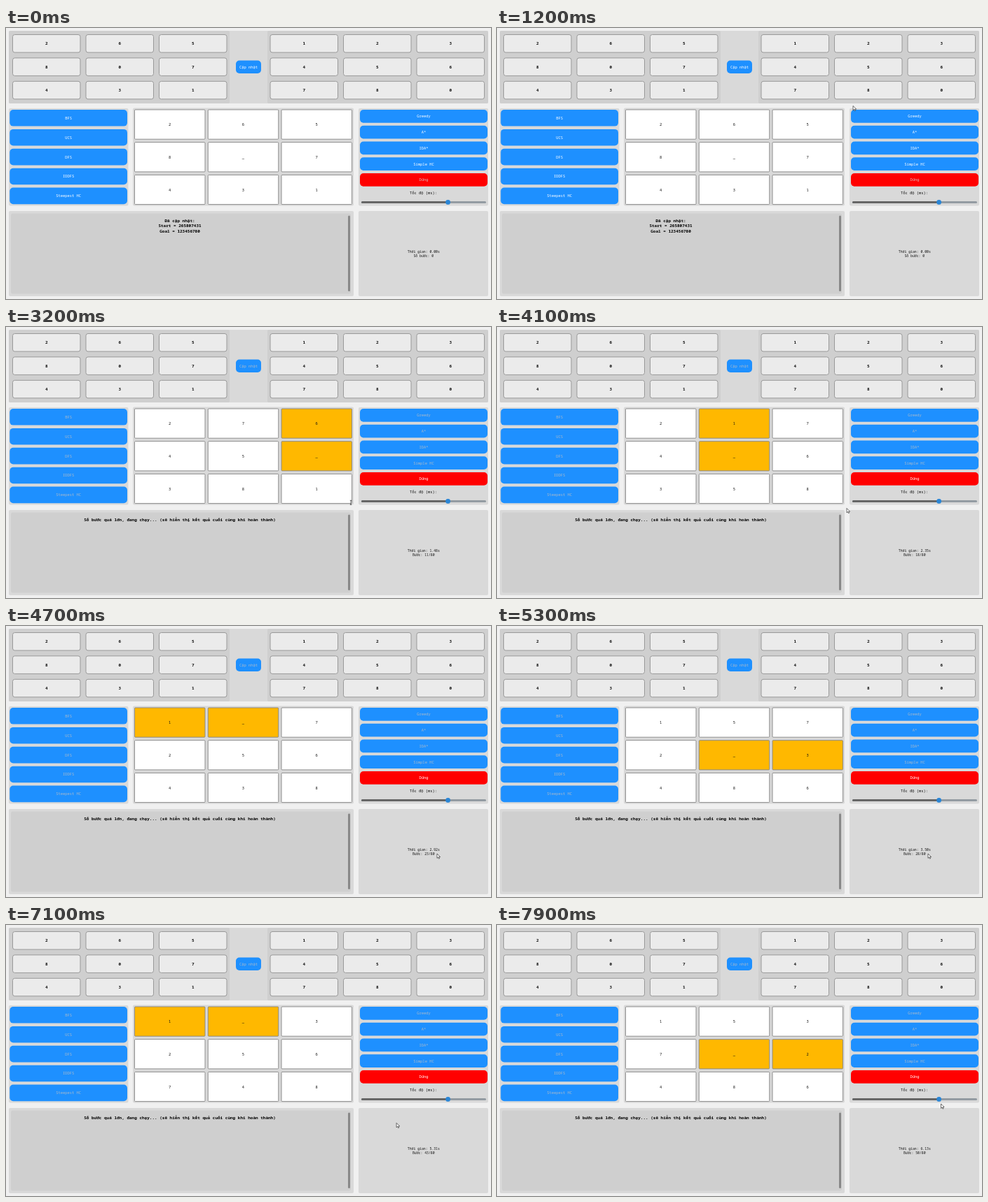
An HTML page for the animation above (8000 ms loop, 692 px wide and 388 px high).

```html
<!DOCTYPE html>
<html lang="vi">
<head>
<meta charset="utf-8">
<style>
  html, body { margin: 0; width: 100%; height: 100%; overflow: hidden; background: #f0f0f0; }
  svg { display: block; width: 692px; height: 388px; }
  text { font-family: "Noto Sans Mono", "DejaVu Sans Mono", monospace; text-anchor: middle; white-space: pre; }
</style>
</head>
<body>
<svg id="stage" viewBox="0 0 692 388"></svg>
<script>
const LOOP = 8000;
const START = 1800;
const TICK = 100;
const BLUE = '#1e90ff', PANEL = '#d9d9d9', INSET = '#cfcfcf', AMBER = '#ffb800';
const stage = document.getElementById('stage');

function add(tag, attrs, content) {
  const el = document.createElementNS('http://www.w3.org/2000/svg', tag);
  for (const key in attrs) el.setAttribute(key, attrs[key]);
  if (content !== undefined) el.textContent = content;
  return stage.appendChild(el);
}

function rect(x, y, width, height, fill, rx = 0, extra = {}) {
  return add('rect', { x, y, width, height, fill, rx, ...extra });
}

// Text centred on (x, y)
function label(x, y, content, size, fill = '#111', weight = 400) {
  return add('text', { x, y: y + size * 0.35, 'font-size': size, fill, 'font-weight': weight }, content);
}

function button(x, y, width, height, content, fill = BLUE) {
  rect(x, y, width, height, fill, 5);
  return label(x + width / 2, y + height / 2, content, 5.45, '#fff');
}

function setText(el, content) {
  if (el.textContent !== content) el.textContent = content;
}

// Start and goal editors
rect(4, 4, 684, 104, PANEL, 2);
function editor(panelX, panelWidth, cellX, digits) {
  rect(panelX, 4, panelWidth, 104, INSET, 2);
  [...digits].forEach((digit, i) => {
    const x = cellX + (i % 3) * 104.5, y = 9.5 + Math.floor(i / 3) * 33.4;
    rect(x, y, 96.5, 25.5, '#ebebeb', 3, { stroke: '#999', 'stroke-width': 1 });
    label(x + 48.2, y + 12.7, digit, 6, '#111', 700);
  });
}
editor(4, 315, 9.5, '265807431');
editor(373, 315, 377, '123456780');
const actions = [button(328, 46.5, 36, 18.5, 'Cập nhật')];

// Algorithm buttons
rect(4, 115, 170.5, 139.5, PANEL, 2);
['BFS', 'UCS', 'DFS', 'IDDFS', 'Steepest HC'].forEach((name, i) =>
  actions.push(button(5.3, 117 + i * 27.9, 167.7, 23.6, name)));

rect(503, 115, 185, 139.5, PANEL, 2);
['Greedy', 'A*', 'IDA*', 'Simple HC'].forEach((name, i) =>
  actions.push(button(505, 117 + i * 22.75, 182, 18.8, name)));
const stopText = button(505, 208, 182, 18.8, 'Dừng', '#ff0000');

// Speed slider
label(595.5, 236.5, 'Tốc độ (ms):', 5.45);
rect(507, 248, 178, 3, '#939ba2', 1.5);
rect(507, 248, 124, 3, '#666', 1.5);
add('circle', { cx: 630.6, cy: 249.4, r: 3.4, fill: '#2a86d6' });

// Board
rect(181, 114.5, 315, 140, PANEL, 2);
const cells = Array.from({ length: 9 }, (_, i) => {
  const x = 183.5 + (i % 3) * 104.75, y = 117 + Math.floor(i / 3) * 46.7;
  return {
    box: rect(x, y, 100.5, 42.2, '#fff', 1, { stroke: '#858585', 'stroke-width': 0.9 }),
    text: label(x + 50.2, y + 21.2, '', 5.45)
  };
});

// Log and statistics
rect(4, 262, 492, 122, PANEL, 2);
rect(7, 265.5, 485, 115, INSET, 3);
rect(488, 268.5, 3, 108.5, '#888', 1.5);
const logLines = [275.5, 283.3, 291.3].map(y => label(248, y, '', 6, '#000', 700));
rect(503, 262, 185, 122, PANEL, 2);
const timeText = label(595.8, 320, '', 4.8);
const stepText = label(595.8, 326, '', 4.8);

// Pointers
const arrow = add('path', {
  d: 'M0 0V6.4L1.5 5L2.5 7.2L3.6 6.7L2.6 4.6H4.6Z',
  fill: '#fff', stroke: '#111', 'stroke-width': 0.6
});
const beam = add('path', { d: 'M-1.2 0H1.2M0 0V6M-1.2 6H1.2', stroke: '#222', 'stroke-width': 0.7 });

// Cells visited by the blank, one per step
const BLANK_PATH = '4' + '12543674125' + '8745214' + '7630147854' + '125410345' + '8763014367854';

// boards[n] is the board after n moves
const boards = [[...'2658_7431']];
for (let n = 1; n < BLANK_PATH.length; n++) {
  const board = [...boards[n - 1]];
  const from = +BLANK_PATH[n - 1], to = +BLANK_PATH[n];
  [board[from], board[to]] = [board[to], board[from]];
  boards.push(board);
}

const PAUSES = [2700, 3300, 3800, 4400, 5000, 5700, 6300, 7000, 7600];
const ELAPSED = [[0, 0.18], [2, 0.42], [11, 1.48], [18, 2.35], [28, 3.5], [37, 4.61], [50, 6.13]];
const POINTER = [
  [600, 346, 62], [1400, 562, 128], [1500, 562, 128], [1600, 564, 127.5], [2600, 564, 127.5],
  [3200, 492, 248.3], [3800, 492, 248.3], [4100, 499, 259.5], [4700, 615, 326], [5700, 615, 326],
  [6400, 503.5, 306.5], [6600, 503.5, 306.5], [7500, 600, 265], [7600, 600, 265], [7900, 633.5, 256]
];

// Linear interpolation through [position, value, ...] keys
function along(keys, position, column = 1) {
  const next = keys.findIndex(key => key[0] >= position);
  if (next === 0) return keys[0][column];
  if (next < 0) return keys[keys.length - 1][column];
  const a = keys[next - 1], b = keys[next];
  return a[column] + (b[column] - a[column]) * (position - a[0]) / (b[0] - a[0]);
}

function stepAt(t) {
  const ticks = (t - 2000) / TICK - PAUSES.filter(pause => pause <= t).length;
  return Math.max(0, Math.min(BLANK_PATH.length - 1, ticks));
}

function render(time) {
  const t = Math.floor((time % LOOP) / TICK) * TICK;
  const running = t >= START;
  const step = stepAt(t);
  const moved = step ? [+BLANK_PATH[step - 1], +BLANK_PATH[step]] : [];

  cells.forEach(({ box, text }, i) => {
    box.setAttribute('fill', moved.includes(i) ? AMBER : '#fff');
    setText(text, boards[step][i]);
  });

  actions.forEach(el => el.setAttribute('fill', running ? '#a9b9c9' : '#fff'));
  stopText.setAttribute('fill', running ? '#fff' : '#d8bcbc');

  const log = running
    ? ['Số bước quá lớn, đang chạy... (sẽ hiển thị kết quả cuối cùng khi hoàn thành)', '', '']
    : ['Đã cập nhật:', 'Start = 265807431', 'Goal = 123456780'];
  logLines.forEach((el, i) => setText(el, log[i]));

  const seconds = running ? along(ELAPSED, step) : 0;
  setText(timeText, `Thời gian: ${seconds.toFixed(2)}s`);
  setText(stepText, running ? `Bước: ${step}/80` : 'Số bước: 0');

  const overText = t >= 3200 && t <= 3800;
  const place = `translate(${along(POINTER, t)} ${along(POINTER, t, 2)})`;
  for (const [el, shown] of [[arrow, t >= 600 && !overText], [beam, overText]]) {
    el.setAttribute('transform', place);
    el.setAttribute('visibility', shown ? 'visible' : 'hidden');
  }
}

const origin = performance.now();
function frame() {
  render(performance.now() - origin);
  requestAnimationFrame(frame);
}
frame();
</script>
</body>
</html>
```
